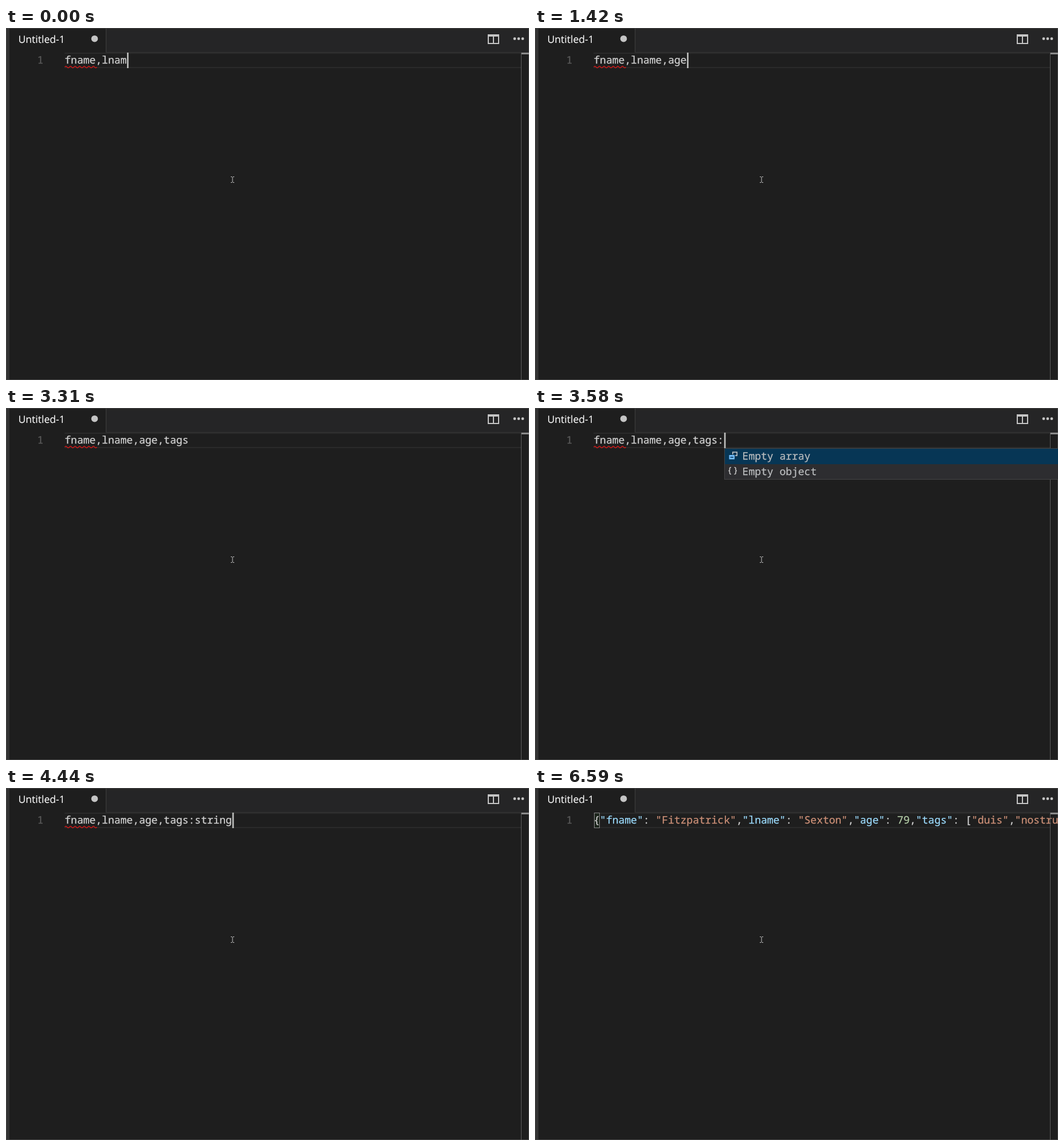
These frames come from a looping animation (912x614 px, 8 s). An HTML page:

```html
<!DOCTYPE html>
<html lang="en">
<head>
<meta charset="utf-8">
<title>Editor typing</title>
<style>
  html, body { margin: 0; width: 100%; height: 100%; overflow: hidden; background: #1e1e1e; }
  svg { display: block; width: 912px; height: 614px; }
  text, tspan { fill: currentColor; stroke: currentColor; stroke-width: .25px; }
  text { white-space: pre; text-rendering: geometricPrecision; color: #d4d4d4; }
  .code { font: 18px "Noto Sans Mono", "DejaVu Sans Mono", monospace; }
  .title { font: 17.6px "Open Sans", "Noto Sans", sans-serif; color: #fff; stroke-width: .1px; }
  .lineno { color: #5a5a5a; }
  .option { color: #bcbec0; }
  .key { color: #9cdcfe; }
  .string { color: #ce9178; }
  .number { color: #b5cea8; }
  .icon { fill: #c5c5c5; }
</style>
</head>
<body>
<svg viewBox="0 0 912 614">
  <rect width="912" height="614" fill="#1e1e1e"/>
  <rect width="912" height="43" fill="#252526"/>
  <rect x="6" width="168" height="43" fill="#1e1e1e"/>
  <rect width="6" height="614" fill="#333"/>
  <rect x="174" y="1" width="1" height="42" fill="#3f3f3f"/>
  <rect x="174" y="42" width="738" height="1" fill="#343434"/>
  <rect x=".5" y=".5" width="911" height="613" fill="none" stroke="#444"/>

  <text class="title" x="21.5" y="26">Untitled-1</text>
  <circle class="icon" cx="154.5" cy="18.7" r="5.8"/>
  <path class="icon" fill-rule="evenodd" d="M840 11h20v17h-20zM842 15v11h7v-11zM851 15v11h7v-11z"/>
  <g class="icon">
    <circle cx="887" cy="18.7" r="2.4"/><circle cx="894" cy="18.7" r="2.4"/><circle cx="901" cy="18.7" r="2.4"/>
  </g>

  <path d="M102 44H898M102 69H898" stroke="#2a2a2a" stroke-width="2"/>
  <text class="code lineno" x="54.6" y="62">1</text>

  <rect id="bracket" x="103.5" y="43.5" width="9" height="26" fill="#1c251c" stroke="#888"/>
  <text id="line" class="code" x="102.3" y="62"></text>
  <path id="squiggle" fill="none" stroke="#d81616" stroke-width="1.4"/>

  <rect x="898" y="43" width="1" height="571" fill="#5c5c5c"/>
  <rect x="899" y="43" width="13" height="3" fill="#8c8c8c"/>

  <g id="popup">
    <rect x="330.5" y="70.5" width="590" height="54" fill="#2d2d30" stroke="#454545"/>
    <rect x="331" y="71" width="581" height="27" fill="#073655"/>
    <rect x="344.8" y="77" width="7.4" height="6" fill="none" stroke="#c5c5c5" stroke-width="1.6"/>
    <rect x="338" y="81.5" width="10.5" height="8.5" fill="#75beff" stroke="#073655"/>
    <path d="M340.5 85.8h5.5" stroke="#073655" stroke-width="1.6"/>
    <path d="M342 103.5q-2.5 0-2.5 2v2q0 2-2 2q2 0 2 2v2q0 2 2.5 2M347.5 103.5q2.5 0 2.5 2v2q0 2 2 2q-2 0-2 2v2q0 2-2.5 2"
          fill="none" stroke="#c5c5c5" stroke-width="1.6"/>
    <text class="code option" x="361.6" y="90">Empty array</text>
    <text class="code option" x="361.6" y="117">Empty object</text>
  </g>

  <rect id="caret" y="43" width="2.7" height="27" fill="#bcbdbb"/>
  <path d="M392 259.5h2l1 1l1-1h2M395 260.5v8M392 269.5h2l1-1l1 1h2" fill="none" stroke="#c4c4c4"/>
</svg>
<script>
const LOOP = 8000;
const CHAR = 10.8;
const TYPED = "fname,lname,age,tags:string@3";
const JSON_LINE = '{"fname": "Fitzpatrick","lname": "Sexton","age": 79,"tags": ["duis","nostrud"';

// [time, typed characters]
const KEYS = [
  [0, 10], [140, 11], [1010, 12], [1280, 14], [1420, 15], [2090, 16],
  [2380, 17], [2510, 18], [2650, 19], [2780, 20], [3580, 21], [3740, 22],
  [4040, 23], [4170, 25], [4310, 26], [4440, 27], [4990, 28], [5860, 29]
];
// Caret blinked off until the next key press
const BLINKS = [[700, 1010], [1960, 2090], [3310, 3580], [5590, 5860], [6450, 6590]];
const POPUP = [3580, 3740];
const EXPAND = 6590;

const el = id => document.getElementById(id);
const within = (t, [from, to]) => t >= from && t < to;
const show = (id, on) => el(id).setAttribute("visibility", on ? "visible" : "hidden");

function kindOf(token) {
  if (token.endsWith(":")) return "key";
  if (token[0] === '"') return "string";
  return /\d/.test(token) ? "number" : "";
}

function highlight(source) {
  return source.replace(/"[^"]*":?|\d+/g, token => {
    const colon = token.endsWith(":") ? ":" : "";
    const body = colon ? token.slice(0, -1) : token;
    return `<tspan class="${kindOf(token)}">${body}</tspan>${colon}`;
  });
}

let shown = "";
function setLine(source) {
  if (source === shown) return;
  shown = source;
  el("line").innerHTML = highlight(source);
}

function wave(x, end, y) {
  let d = `M${x} ${y}`;
  for (let up = true; x < end; x += 4, up = !up) d += `q2 ${up ? -2.8 : 2.8} 4 0`;
  return d;
}

function render(t) {
  const expanded = t >= EXPAND;
  const count = KEYS.filter(([time]) => time <= t).pop()[1];
  setLine(expanded ? JSON_LINE : TYPED.slice(0, count));
  el("caret").setAttribute("x", 103 + CHAR * count);
  show("caret", !expanded && !BLINKS.some(span => within(t, span)));
  show("popup", within(t, POPUP));
  show("squiggle", !expanded);
  show("bracket", expanded);
}

el("squiggle").setAttribute("d", wave(102.5, 156, 68.2));
const start = performance.now();
function tick() {
  render((performance.now() - start) % LOOP);
  requestAnimationFrame(tick);
}
tick();
</script>
</body>
</html>
```
